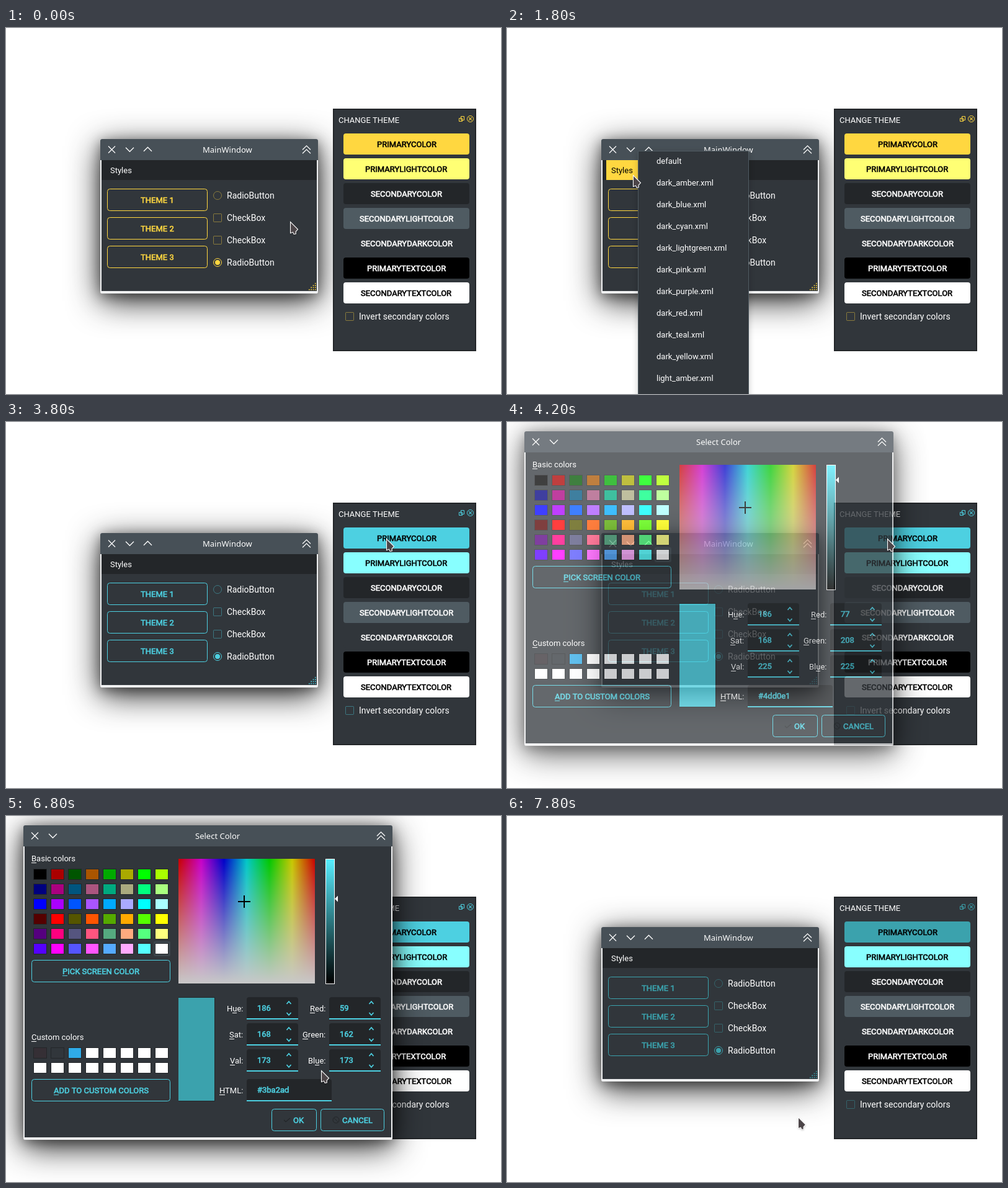
Recreate the animation shown at these times as an HTML page with a canvas. Size 798 by 590 pixels, loop 8000 ms.

```html
<!DOCTYPE html>
<html lang="en">
<head>
<meta charset="utf-8">
<title>Theme editor</title>
<style>
  html, body { margin: 0; width: 100%; height: 100%; overflow: hidden; background: #fff; }
  canvas { display: block; }
</style>
</head>
<body>
<canvas id="stage" width="798" height="590"></canvas>
<script>
const W = 798, H = 590, LOOP = 8000, TICK = 100;
const DARK = '#31363b', DARKER = '#232629', SLATE = '#4f5b62', BAR = '#475057', EDGE = '#eff0f1';
const stage = document.getElementById('stage').getContext('2d');
const layer = Object.assign(document.createElement('canvas'), { width: W, height: H }).getContext('2d');
let ctx = stage;

const AMBER = { primary: '#ffd740', light: '#ffff74' };
const CYAN = { primary: '#4dd0e1', light: '#88ffff' };
const TEAL = { primary: '#3ba2ad', light: '#88ffff' };

// Pointer path: [ms, x, y]
const PATH = [
  [500, 458, 312], [1200, 196, 230], [1700, 196, 230], [2300, 296, 318],
  [3200, 296, 318], [3800, 613, 188], [4500, 613, 188], [4700, 653, 150],
  [4800, 628, 112], [4900, 580, 90], [5000, 546, 115], [5300, 541, 251],
  [5400, 540, 245], [5700, 516, 87], [5800, 516, 87], [5900, 518, 95],
  [6000, 518, 95], [6400, 529, 134], [6700, 529, 134], [6800, 508, 410],
  [6900, 508, 410], [7400, 469, 485]
];

// Opacity steps: [ms, value]
const MENU_FADE = [[0, 0], [1400, .5], [1500, 1], [2500, .52], [3000, 0]];
const DIALOG_FADE = [[0, 0], [4100, .35], [4200, .75], [4300, 1], [7500, .7], [7600, .3], [7700, 0]];

const MENU_ITEMS = ['default', ...['amber', 'blue', 'cyan', 'lightgreen', 'pink', 'purple', 'red', 'teal', 'yellow']
  .map(name => `dark_${name}.xml`), 'light_amber.xml'];

const stepAt = (steps, t) => steps.filter(([ms]) => ms <= t).pop()[1];

function pointerAt(t) {
  const i = PATH.findIndex(([ms]) => ms > t);
  if (i < 0) return PATH[PATH.length - 1].slice(1);
  if (i === 0) return PATH[0].slice(1);
  const [t0, x0, y0] = PATH[i - 1], [t1, x1, y1] = PATH[i];
  const u = (t - t0) / (t1 - t0), e = u * u * (3 - 2 * u);
  return [Math.round(x0 + (x1 - x0) * e), Math.round(y0 + (y1 - y0) * e)];
}

function box(x, y, w, h, color, r = 0) {
  ctx.fillStyle = color;
  ctx.beginPath();
  ctx.roundRect(x, y, w, h, r);
  ctx.fill();
}

function outline(x, y, w, h, color, r = 0) {
  ctx.strokeStyle = color;
  ctx.lineWidth = 1;
  ctx.beginPath();
  ctx.roundRect(x + .5, y + .5, w - 1, h - 1, r);
  ctx.stroke();
}

function line(points, color, width = 1) {
  ctx.strokeStyle = color;
  ctx.lineWidth = width;
  ctx.beginPath();
  points.forEach(([x, y]) => ctx.lineTo(x, y));
  ctx.stroke();
}

function circle(x, y, r, color, fill) {
  ctx.beginPath();
  ctx.arc(x, y, r, 0, 7);
  ctx.fillStyle = ctx.strokeStyle = color;
  ctx.lineWidth = 1;
  fill ? ctx.fill() : ctx.stroke();
}

function cross(x, y, r, color, width) {
  line([[x - r, y - r], [x + r, y + r]], color, width);
  line([[x - r, y + r], [x + r, y - r]], color, width);
}

// A negative rise points the chevron down.
const chevron = (x, y, half, rise, color, width) =>
  line([[x - half, y + rise], [x, y - rise], [x + half, y + rise]], color, width);

// mark: index of the underlined shortcut letter
function text(str, x, y, { color = '#fff', size = 13, bold, align = 'left', mark = -1, font = 'Roboto' } = {}) {
  ctx.font = `${size}px ${font}, sans-serif`;
  ctx.fillStyle = ctx.strokeStyle = color;
  const width = ctx.measureText(str).width;
  const left = Math.round(align === 'center' ? x - width / 2 : align === 'right' ? x - width : x);
  ctx.fillText(str, left, y);
  if (bold) {
    ctx.lineWidth = .6;
    ctx.strokeText(str, left, y);
  }
  if (mark >= 0) {
    const start = ctx.measureText(str.slice(0, mark)).width;
    ctx.fillRect(Math.round(left + start), y + 2, Math.round(ctx.measureText(str[mark]).width), 1);
  }
}

function faded(alpha, draw) {
  ctx.save();
  ctx.globalAlpha *= alpha;
  draw();
  ctx.restore();
}

function group(alpha, draw) {
  if (!alpha) return;
  layer.clearRect(0, 0, W, H);
  ctx = layer;
  draw();
  ctx = stage;
  faded(alpha, () => ctx.drawImage(layer.canvas, 0, 0));
}

function shadow(alpha, blur, dy, draw) {
  ctx.save();
  ctx.shadowColor = `rgba(0,0,0,${alpha})`;
  ctx.shadowBlur = blur;
  ctx.shadowOffsetY = dy;
  draw();
  ctx.restore();
}

function windowFrame(x, y, w, h, title, maximize) {
  const body = () => box(x, y, w, h, EDGE, 3);
  shadow(.85, 52, 12, body);
  shadow(.4, 20, 4, body);
  box(x, y, w, 34, BAR, [3, 3, 0, 0]);
  box(x + 2, y + 34, w - 4, h - 38, DARK);
  const white = '#fcfcfc', mid = y + 17;
  cross(x + 18.5, mid, 5.5, white, 1.3);
  chevron(x + 47.5, mid, 6.5, -3.3, white, 1.3);
  if (maximize) chevron(x + 76.5, mid - .5, 6.5, 3.3, white, 1.3);
  chevron(x + w - 18.5, mid - 3, 6.5, 3.2, white, 1.3);
  chevron(x + w - 18.5, mid + 3, 6.5, 3.2, white, 1.3);
  text(title, x + w / 2 + (maximize ? 29 : 16), y + 22, { color: white, align: 'center', font: '"Noto Sans"' });
}

function outlineButton(label, x, y, w, color, mark, textX = x + w / 2) {
  outline(x, y, w, 36, color, 4);
  text(label, textX, y + 23, { color, bold: true, align: 'center', mark });
}

const checkBox = (x, y, color) => faded(.42, () => outline(x, y, 14, 14, color, 1));

function mainWindow({ primary }, hover) {
  windowFrame(152, 179, 351, 249, 'MainWindow', true);
  box(154, 213, 347, 32, DARKER);
  if (hover) box(160, 213, 51, 32, primary);
  text('Styles', 168, 234, { color: hover ? '#000' : '#fff' });
  for (let i = 0; i < 3; i++) outlineButton(`THEME ${i + 1}`, 163, 259 + 46 * i, 162, primary);
  ['RadioButton', 'CheckBox', 'CheckBox', 'RadioButton'].forEach((label, i) =>
    text(label, 356, 275 + 36 * i, { size: 14 }));
  faded(.42, () => circle(341, 270, 6.5, primary));
  checkBox(334, 299, primary);
  checkBox(334, 335, primary);
  circle(341, 378, 6.5, primary);
  circle(341, 378, 4, primary, true);
  for (let i = 0; i < 4; i++)
    for (let j = 0; j <= i; j++) box(498 - 3.3 * j, 411 + 3.3 * i, 1.6, 1.6, primary);
}

function dock({ primary, light }) {
  box(527, 130, 231, 391, DARKER);
  box(529, 132, 227, 387, DARK);
  text('CHANGE THEME', 536, 153);
  outline(730, 145, 6, 6, primary);
  outline(733, 142, 6, 7, primary);
  circle(748.5, 146.5, 5, primary);
  cross(748.5, 146.5, 2.3, primary, 1.1);
  [
    ['PRIMARYCOLOR', primary, '#000'], ['PRIMARYLIGHTCOLOR', light, '#000'],
    ['SECONDARYCOLOR', DARKER, '#fff'], ['SECONDARYLIGHTCOLOR', SLATE, '#fff'],
    ['SECONDARYDARKCOLOR', DARK, '#fff'], ['PRIMARYTEXTCOLOR', '#000', '#fff'],
    ['SECONDARYTEXTCOLOR', '#fff', '#000']
  ].forEach(([label, fill, color], i) => {
    box(544, 170 + 40 * i, 203, 34, fill, 4);
    text(label, 645.5, 192 + 40 * i, { color, bold: true, align: 'center' });
  });
  checkBox(547, 458, primary);
  text('Invert secondary colors', 569, 470, { size: 14 });
}

function menu({ primary }, [x, y]) {
  shadow(.2, 10, 3, () => box(211, 198, 179, 420, DARK));
  outline(211, 198, 179, 420, SLATE);
  const active = x >= 211 ? Math.floor((y - 197) / 35) : -1;
  MENU_ITEMS.forEach((item, i) => {
    if (i === active) box(217, 201 + 35 * i, 167, 27, primary);
    text(item, 241, 219 + 35 * i, { color: i === active ? '#000' : '#fff' });
  });
}

function swatch(col, row, top, color) {
  box(44 + 28 * col, top + 24 * row, 22, 18, DARKER);
  box(45 + 28 * col, top + 1 + 24 * row, 20, 16, color);
}

function gradient(x0, y0, x1, y1, colors) {
  const g = ctx.createLinearGradient(x0, y0, x1, y1);
  colors.forEach((color, i) => g.addColorStop(i / (colors.length - 1), color));
  return g;
}

function field(x, y, w, value, primary) {
  box(x, y, w, 36, DARKER, [4, 4, 0, 0]);
  box(x, y + 34, w, 2, primary);
  text(value, x + 17, y + 22, { color: primary, bold: true });
}

function spinBox(label, mark, x, row, value, primary) {
  const y = 292 + 42 * row;
  text(label, x - 6, y + 23, { align: 'right', mark });
  field(x, y, 83, String(value), primary);
  chevron(x + 68, y + 9, 3.5, 2, primary, 1.8);
  chevron(x + 68, y + 27, 3.5, -2, primary, 1.8);
}

function colorDialog({ primary }, val, dragged) {
  const rgb = dragged ? [.3412, .9341, 1].map(k => Math.round(val * k)) : [77, 208, 225];
  const hex = '#' + rgb.map(c => c.toString(16).padStart(2, '0')).join('');
  windowFrame(28, 15, 595, 507, 'Select Color', false);

  text('Basic colors', 41, 73, { mark: 0 });
  box(238, 202, 27, 24, '#3d464c', 2);
  for (let col = 0; col < 8; col++)
    for (let row = 0; row < 6; row++) {
      const r = 85 * (2 * (col % 2) + (row > 2)), g = 85 * (col >> 1), b = 127.5 * (row % 3);
      swatch(col, row, 85, `rgb(${r},${g},${Math.floor(b)})`);
    }
  outlineButton('PICK SCREEN COLOR', 41, 232, 224, primary, 0);

  text('Custom colors', 41, 361, { mark: 0 });
  const custom = ['#352f35', DARK, '#2fabe8'];
  for (let i = 0; i < 16; i++) swatch(i % 8, i >> 3, 373, custom[i] || '#fff');
  outlineButton('ADD TO CUSTOM COLORS', 41, 424, 224, primary, 0);

  const hues = ['200,0,0', '200,0,200', '0,0,200', '0,200,200', '0,200,0', '200,200,0', '200,0,0'];
  box(278, 69, 220, 201, gradient(278, 0, 498, 0, hues.map(c => `rgb(${c})`)));
  box(278, 69, 220, 201, gradient(0, 69, 0, 270, ['rgba(200,200,200,0)', 'rgb(200,200,200)']));
  box(374, 137, 20, 2, '#000');
  box(383, 128, 2, 20, '#000');

  box(515, 69, 15, 202, '#fff');
  box(516, 70, 13, 200, gradient(0, 70, 0, 270, ['#57eeff', '#000']));
  const tip = Math.round(70 + (255 - val) * 200 / 255) - .5;
  ctx.fillStyle = '#fff';
  ctx.beginPath();
  [[530, tip], [535, tip - 5], [535, tip + 5]].forEach(p => ctx.lineTo(...p));
  ctx.fill();

  box(278, 292, 59, 168, DARKER);
  box(278, 293, 58, 166, hex);
  [['Hue:', 1, 186], ['Sat:', 0, 168], ['Val:', 0, val]].forEach(([label, mark, v], i) =>
    spinBox(label, mark, 388, i, v, primary));
  [['Red:', 0], ['Green:', 0], ['Blue:', 2]].forEach(([label, mark], i) =>
    spinBox(label, mark, 521, i, rgb[i], primary));
  text('HTML:', 382, 447, { align: 'right', mark: 0 });
  field(388, 424, 137, hex, primary);

  outlineButton('OK', 428, 472, 73, primary, -1, 472);
  line([[448, 490], [451, 493], [458, 487]], DARKER, 1.2);
  outlineButton('CANCEL', 507, 472, 103, primary, -1, 567);
  circle(532, 490, 5, DARKER);
  line([[528.5, 486.5], [535.5, 493.5]], DARKER);
}

function pointer([x, y]) {
  const shape = [[0, 0], [0, 18.2], [4, 16.6], [5.6, 20], [8.8, 19.4], [8.6, 15.8], [12, 12]];
  ctx.beginPath();
  shape.forEach(([dx, dy]) => ctx.lineTo(x + .5 + dx, y + .5 + dy));
  ctx.closePath();
  shadow(.35, 3, 1, () => {
    ctx.fillStyle = '#4c4548';
    ctx.fill();
  });
  ctx.strokeStyle = '#fff';
  ctx.lineWidth = 1.1;
  ctx.stroke();
}

function render(now) {
  const t = Math.floor(now % LOOP / TICK) * TICK;
  const theme = t < 3000 ? AMBER : t < 7800 ? CYAN : TEAL;
  const at = pointerAt(t);
  const overStyles = at[0] >= 160 && at[0] < 211 && at[1] >= 213 && at[1] < 245;
  const menuAlpha = stepAt(MENU_FADE, t);
  const dragged = t >= 5900;
  const val = dragged ? Math.round(255 - (Math.min(at[1], 134) - 70) * 255 / 200) : 225;

  box(0, 0, W, H, '#fff');
  mainWindow(theme, overStyles || menuAlpha > 0);
  dock(theme);
  group(menuAlpha, () => menu(theme, at));
  group(stepAt(DIALOG_FADE, t), () => colorDialog(theme, val, dragged));
  pointer(at);
}

const start = performance.now();
(function frame() {
  render(performance.now() - start);
  requestAnimationFrame(frame);
})();
</script>
</body>
</html>
```
